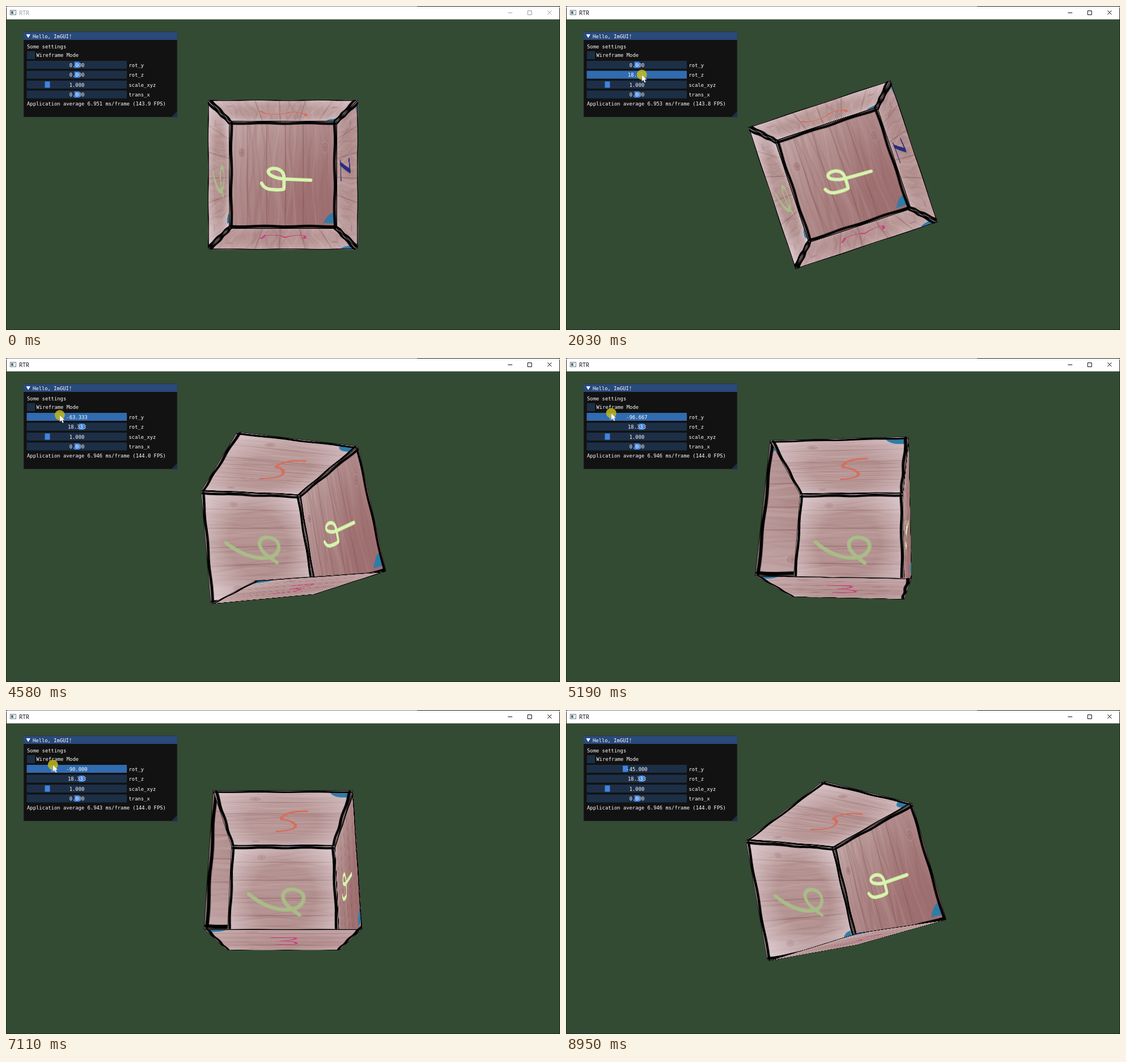
Write an HTML page with a canvas that moves like this. It is 977x573 px and loops after 9.05 s.

```html
<!DOCTYPE html>
<html lang="en">
<head>
<meta charset="utf-8">
<title>RTR</title>
<style>
  html, body { margin: 0; width: 100%; height: 100%; overflow: hidden; background: #334b33; }
  canvas { position: absolute; left: 378.05px; top: 188.05px; width: 220.9px; height: 220.9px; }
  svg { position: absolute; left: 0; top: 0; }
  text { font: 8.85px "DejaVu Sans Mono", monospace; fill: #fff; white-space: pre; }
  #caption { font: 10px "Open Sans", sans-serif; }
</style>
</head>
<body>
<svg id="ui" width="977" height="573" viewBox="0 0 977 573">
  <rect width="977" height="23.6" fill="#fff"/>
  <path d="M.5 3V573M976.5 3V573M0 572.5H977" stroke="#20291f" fill="none"/>
  <path d="M0 .5H725" stroke="#8c8c8c"/>
  <path d="M725 .5H977" stroke="#222"/>
  <path d="M0 0H4Q0 0 0 4ZM977 0H973Q977 0 977 4Z" fill="#222"/>
  <rect x="7.5" y="7.5" width="10" height="8" fill="#fff" stroke="#777"/>
  <rect x="9" y="9" width="4" height="5" fill="#3d7f78"/>
  <g id="frame">
    <text id="caption" x="23" y="15.5" stroke="none" style="fill:inherit">RTR</text>
    <path d="M885 12H893M920 8.5H927V15.5H920ZM955 8L962 15M962 8L955 15" fill="none"/>
  </g>
  <rect x="31" y="45.5" width="271" height="151" fill="#111211" stroke="#353a3d" stroke-width=".7"/>
  <rect x="31" y="46" width="271" height="14" fill="#294a7a"/>
  <path d="M35.5 50H43L39.2 56.5Z" fill="#fff"/>
  <path d="M302 186V196H292Z" fill="#1c2f4a"/>
  <text x="47" y="56.5">Hello, ImGUI!</text>
  <text x="37" y="75">Some settings</text>
  <rect x="37" y="80" width="14" height="14" fill="#1d2f47"/>
  <text x="53.5" y="90">Wireframe Mode</text>
  <g id="sliders"></g>
  <text id="fps" x="37" y="175.5"></text>
  <g id="cursor">
    <circle r="9" fill="#bcb51b" opacity=".88"/>
    <path d="M0 0V12L2.8 9.6L4.9 14L7 13L5 8.8H8.7Z" fill="#fff" stroke="#555" stroke-width=".4"/>
  </g>
</svg>
<script>
const LOOP = 9050, SIZE = 256, HALF = 110.45, STEP = 5 / 3;
const $ = id => document.getElementById(id);

let seed = 7;
const random = () => (seed = seed * 16807 % 2147483647) / 2147483647;

// ---- crate textures ----
function drawWood(g, { vertical, from, to, glow }) {
  const base = g.createLinearGradient(0, 0, SIZE, SIZE);
  base.addColorStop(0, from);
  base.addColorStop(1, to);
  g.fillStyle = base;
  g.fillRect(0, 0, SIZE, SIZE);

  g.save();
  if (vertical) g.transform(0, 1, 1, 0, 0, 0);
  for (let i = 0; i < 36; i++) {
    const y = i * 7.2 + random() * 5, phase = random() * 6, bend = 2 + random() * 5;
    g.beginPath();
    for (let x = 0; x <= SIZE; x += 8) g.lineTo(x, y + bend * Math.sin(x / 34 + phase));
    g.lineWidth = 1.5 + random() * 5;
    g.strokeStyle = `rgba(${random() < .4 ? '220,195,195' : '135,88,90'},${.06 + random() * .12})`;
    g.stroke();
  }
  for (const [x, y, r] of [[75, 30, 6], [62, 228, 6]]) {
    for (let ring = 4; ring; ring--) {
      g.beginPath();
      g.ellipse(x, y, r * ring * .6, r * ring * .4, 0, 0, 7);
      g.fillStyle = ring % 2 ? 'rgba(120,70,72,.28)' : 'rgba(190,155,155,.25)';
      g.fill();
    }
  }
  g.fillStyle = 'rgba(120,68,72,.38)';
  for (const y of [42, 88, 133, 175]) g.fillRect(0, y, SIZE, 2.2);
  g.restore();

  const shine = g.createRadialGradient(128, 128, 75, 128, 128, 180);
  shine.addColorStop(0, 'rgba(238,226,233,0)');
  shine.addColorStop(1, `rgba(238,226,233,${glow})`);
  g.fillStyle = shine;
  g.fillRect(0, 0, SIZE, SIZE);
}

function drawBorder(g) {
  g.strokeStyle = '#000';
  for (let side = 0; side < 4; side++) {
    g.beginPath();
    for (let x = 4; x <= 252; x += 15.5) g.lineTo(x, 4.8 + .9 * Math.sin(x / 17 + side * 2));
    g.lineWidth = 6;
    g.stroke();
    g.lineWidth = 1.6;
    g.strokeRect(0, 0, SIZE, .1);
    g.translate(SIZE, 0);
    g.rotate(Math.PI / 2);
  }
}

function makeFace(face) {
  const canvas = document.createElement('canvas');
  canvas.width = canvas.height = SIZE;
  const g = canvas.getContext('2d');
  g.lineCap = g.lineJoin = 'round';
  drawWood(g, face);
  g.fillStyle = '#2f7ca6';
  g.fill(new Path2D(face.corner));
  g.strokeStyle = face.ink;
  g.lineWidth = face.pen;
  g.stroke(new Path2D(face.digit));
  drawBorder(g);
  document.body.insertBefore(canvas, $('ui'));
  return { canvas, place: face.place };
}

// The faces paint in this fixed order, without a depth test.
const faces = [
  { place: `rotateY(90deg) translateZ(${HALF}px)`, from: '#a98484', to: '#bfa09f', glow: .3,
    ink: '#292c7c', pen: 9, digit: 'M88 99L76 121Q140 113 198 103M187 140Q189 120 197 97',
    corner: 'M5 5H24L5 30Z' },
  { place: `translateZ(${-HALF}px)`, vertical: true, from: '#bfa2a1', to: '#935e5f', glow: .12,
    ink: '#d6f5ad', pen: 8,
    digit: 'M77 148Q81 158 93 162Q120 166 130 162Q131 148 130 130C126 110 97 109 93 119C91 129 114 137 130 138L194 141',
    corner: 'M224 243Q236 220 250 218V244Z' },
  { place: `rotateY(90deg) translateZ(${-HALF}px)`, from: '#b89896', to: '#b39291', glow: .8,
    ink: '#a9bc87', pen: 9,
    digit: 'M47 124C75 148 110 165 143 162C172 158 182 138 174 123C163 108 133 108 128 125C125 145 145 158 166 174',
    corner: 'M219 234Q226 222 246 219V241Q224 244 219 234Z' },
  { place: `rotateY(90deg) rotateX(-90deg) translateZ(${-HALF}px)`, from: '#bd9e9d', to: '#b59393', glow: .6,
    ink: '#d4705f', pen: 7, digit: 'M176 78C145 77 123 94 125 114C145 116 166 143 149 160Q135 170 114 172',
    corner: 'M214 6H250V24Q224 28 214 6Z' },
  { place: `rotateY(90deg) rotateX(-90deg) translateZ(${HALF}px)`, from: '#bd9c9c', to: '#b08a8b', glow: .35,
    ink: '#ca427f', pen: 6, digit: 'M108 85L148 82Q162 106 124 124Q164 134 152 165L108 172',
    corner: 'M5 5H38Q26 26 5 28Z' }
].map(makeFace);

// ---- sliders ----
const sliders = [['rot_y', 97], ['rot_z', 114.5], ['scale_xyz', 132], ['trans_x', 149.5]].map(([label, y]) => {
  const row = document.createElementNS('http://www.w3.org/2000/svg', 'g');
  row.innerHTML = `<rect x="36.5" y="${y}" width="176.5" height="14"/>
    <rect y="${y + 1.5}" width="9" height="11"/>
    <text x="125" y="${y + 10.5}" text-anchor="middle"></text>
    <text x="216.5" y="${y + 10.5}">${label}</text>`;
  $('sliders').append(row);
  return row.children;
});

const frameColors = { idle: '#1d2f47', hover: '#22466f', active: '#316bb0' };

function setSlider(index, value, center, state = 'idle') {
  const [track, grab, number] = sliders[index];
  track.setAttribute('fill', frameColors[state]);
  grab.setAttribute('fill', state === 'active' ? '#4296fa' : '#3d85e0');
  grab.setAttribute('x', center - 4.5);
  number.textContent = value.toFixed(3);
}

// ---- timeline ----
const rotY = [[2950, 0], [3450, -11.667], [3770, -20], [4560, -63.333], [4680, -69], [5590, -119],
  [6130, -130], [6260, -130], [6510, -115], [7110, -90], [7420, -73.333], [7930, -45]];
const rotZ = [[1120, 0], [1930, 15], [2010, 18.333]];
const cursorX = [[100, 817], [500, 126], [1100, 125], [2010, 133.8], [2450, 133.8], [2850, 123.5]];
const cursorY = [[100, 541], [500, 123], [1100, 121.5], [2450, 121.5], [2850, 104], [3450, 102],
  [4580, 101], [5590, 95], [6200, 95], [7110, 97], [8100, 98], [8330, 122], [8850, 562]];
const exitX = [[8100, 103], [8330, 222], [8850, 836]];
const frameTimes = [[0, 6.951], [800, 6.953], [2900, 6.949], [4300, 6.946], [5500, 6.945], [7000, 6.943], [8300, 6.946]];

function along(keys, t) {
  const next = keys.findIndex(key => key[0] > t);
  if (next === 0) return keys[0][1];
  if (next < 0) return keys[keys.length - 1][1];
  const [t0, a] = keys[next - 1], [t1, b] = keys[next];
  return a + (b - a) * (t - t0) / (t1 - t0);
}

const snap = value => Math.round(value / STEP) * STEP + 0;
const grabX = angle => 125 + angle * .4528;

const captureTime = t => t < 1100
  ? Math.floor(t / 100) * 100
  : 1100 + Math.floor((t - 1100) / 101.95 + .06) * 101.95;

function render(t) {
  const y = snap(along(rotY, t)), z = snap(along(rotZ, t));
  for (const { canvas, place } of faces)
    canvas.style.transform = `perspective(662.7px) rotateY(${y}deg) rotateZ(${-z}deg) ${place}`;

  const stateY = t < 2700 || t > 8150 ? 'idle' : t < 2900 || t > 8040 ? 'hover' : 'active';
  const stateZ = t < 450 || t > 2600 ? 'idle' : t < 1090 || t > 2300 ? 'hover' : 'active';
  setSlider(0, y, grabX(y), stateY);
  setSlider(1, z, grabX(z), stateZ);
  setSlider(2, 1, 73);
  setSlider(3, 0, 125);

  const ms = frameTimes.filter(([start]) => start <= t).pop()[1];
  $('fps').textContent = `Application average ${ms.toFixed(3)} ms/frame (${(1000 / ms).toFixed(1)} FPS)`;

  const ink = t < 1090 ? '#909a96' : '#000';
  $('frame').setAttribute('fill', ink);
  $('frame').setAttribute('stroke', ink);

  const x = t < 2900 ? along(cursorX, t) : t < 8100 ? grabX(y) - 1.5 : along(exitX, t);
  $('cursor').setAttribute('transform', `translate(${x} ${along(cursorY, t)})`);
  $('cursor').style.display = t < 100 || t > 8900 ? 'none' : '';
}

function tick() {
  render(captureTime(performance.now() % LOOP));
  requestAnimationFrame(tick);
}
tick();
</script>
</body>
</html>
```
